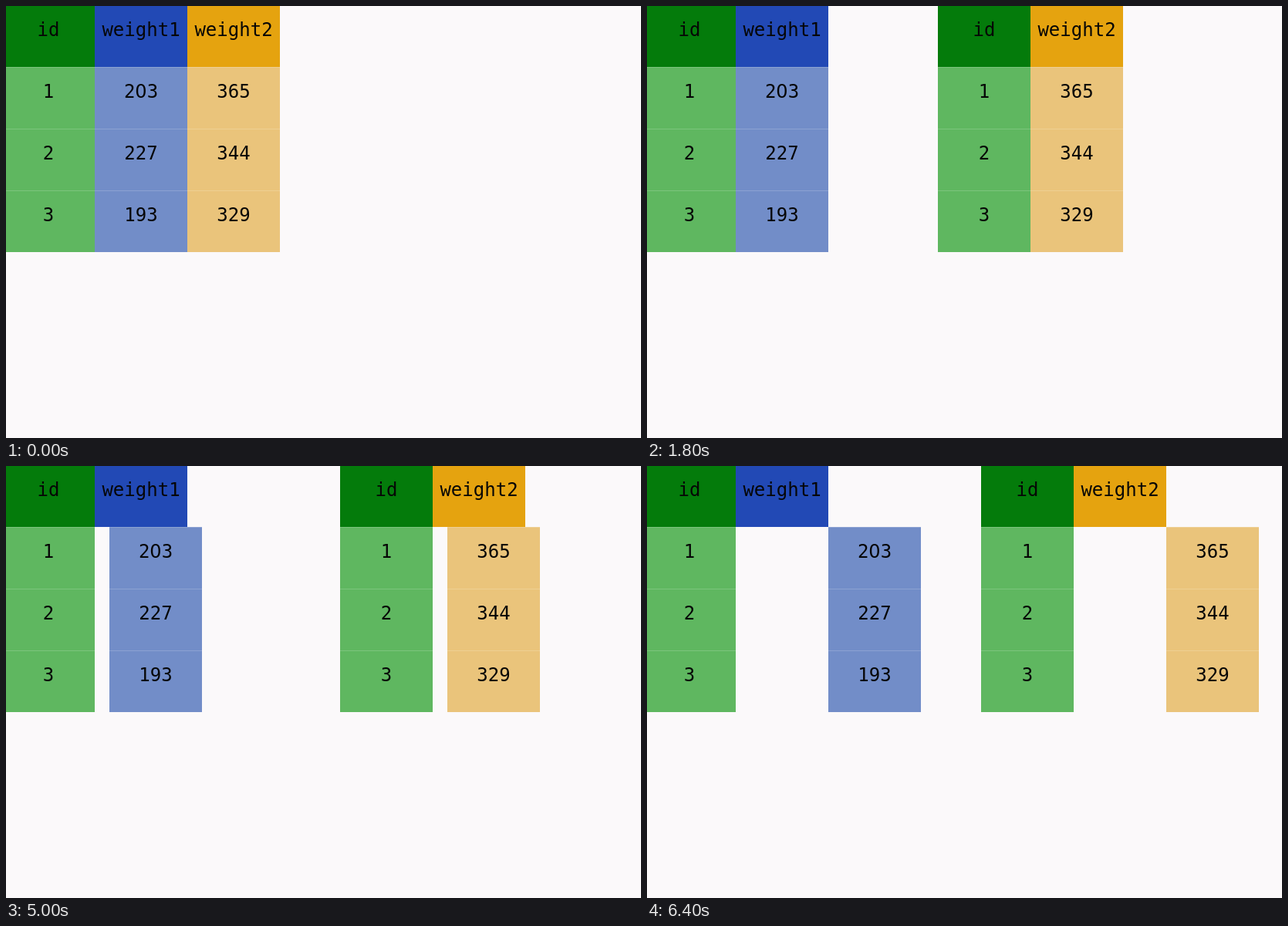
Write an HTML page that moves like this. It is 823x560 px and loops after 8000 ms.

```html
<!DOCTYPE html>
<html lang="en">
<head>
<meta charset="utf-8">
<title>Splitting table columns</title>
<style>
  html, body { margin: 0; width: 100%; height: 100%; overflow: hidden; background: #fbf9fa; }
  svg { display: block; }
  text { font: 24px "DejaVu Sans Mono", monospace; text-anchor: middle; fill: #060606; }
  .zero { font-family: "DejaVu Sans", sans-serif; }
</style>
</head>
<body>
<svg id="stage" width="823" height="560" viewBox="0 0 823 560"></svg>
<script>
const LOOP = 8000, STEP = 100;
const COL = 120, ROW = 80, TOP = -1;
const ID = { head: '#047b0b', body: '#5fb760', cells: ['id', '1', '2', '3'] };
const W1 = { head: '#2249b5', body: '#728dc8', cells: ['weight1', '203', '227', '193'] };
const W2 = { head: '#e5a30f', body: '#eac47b', cells: ['weight2', '365', '344', '329'] };
const SPLIT = { start: 431, length: 1890, distance: 318 };
const SHIFT = { start: 4520, length: 1820, distance: COL };

function add(parent, tag, attrs = {}) {
  const el = document.createElementNS('http://www.w3.org/2000/svg', tag);
  for (const key in attrs) el.setAttribute(key, attrs[key]);
  return parent.appendChild(el);
}

function cell(parent, x, row, label, fill) {
  const y = TOP + row * ROW;
  add(parent, 'rect', { x, y, width: COL, height: ROW, fill });
  if (row) add(parent, 'rect', { x, y, width: COL, height: 1, fill: '#fff', opacity: 0.18 });
  const text = add(parent, 'text', { x: x + COL / 2, y: y + 40 });
  for (const char of label) {
    // zero is drawn without an inner mark
    add(text, 'tspan', char === '0' ? { class: 'zero' } : {}).textContent = char;
  }
}

// Draws a column and returns the group holding its values.
function column(parent, x, { head, body, cells }) {
  const values = add(parent, 'g');
  cells.forEach((label, row) => row
    ? cell(values, x, row, label, body)
    : cell(parent, x, row, label, head));
  return values;
}

const stage = document.getElementById('stage');
const copy = add(stage, 'g');
column(copy, 115, ID);
const values2 = column(copy, 235, W2);
column(stage, -5, ID);
const values1 = column(stage, 115, W1);

function travel(time, { start, length, distance }) {
  const p = Math.min(1, Math.max(0, (time - start) / length));
  return Math.round(distance * (1 - Math.cos(Math.PI * p)) / 2);
}

const moveTo = (el, x) => el.setAttribute('transform', `translate(${x} 0)`);

function draw(now) {
  const time = Math.floor((now % LOOP) / STEP) * STEP;
  const shift = travel(time, SHIFT);
  moveTo(copy, travel(time, SPLIT));
  moveTo(values1, shift);
  moveTo(values2, shift);
}

const begin = performance.now();
function tick() {
  draw(performance.now() - begin);
  requestAnimationFrame(tick);
}
tick();
</script>
</body>
</html>
```
